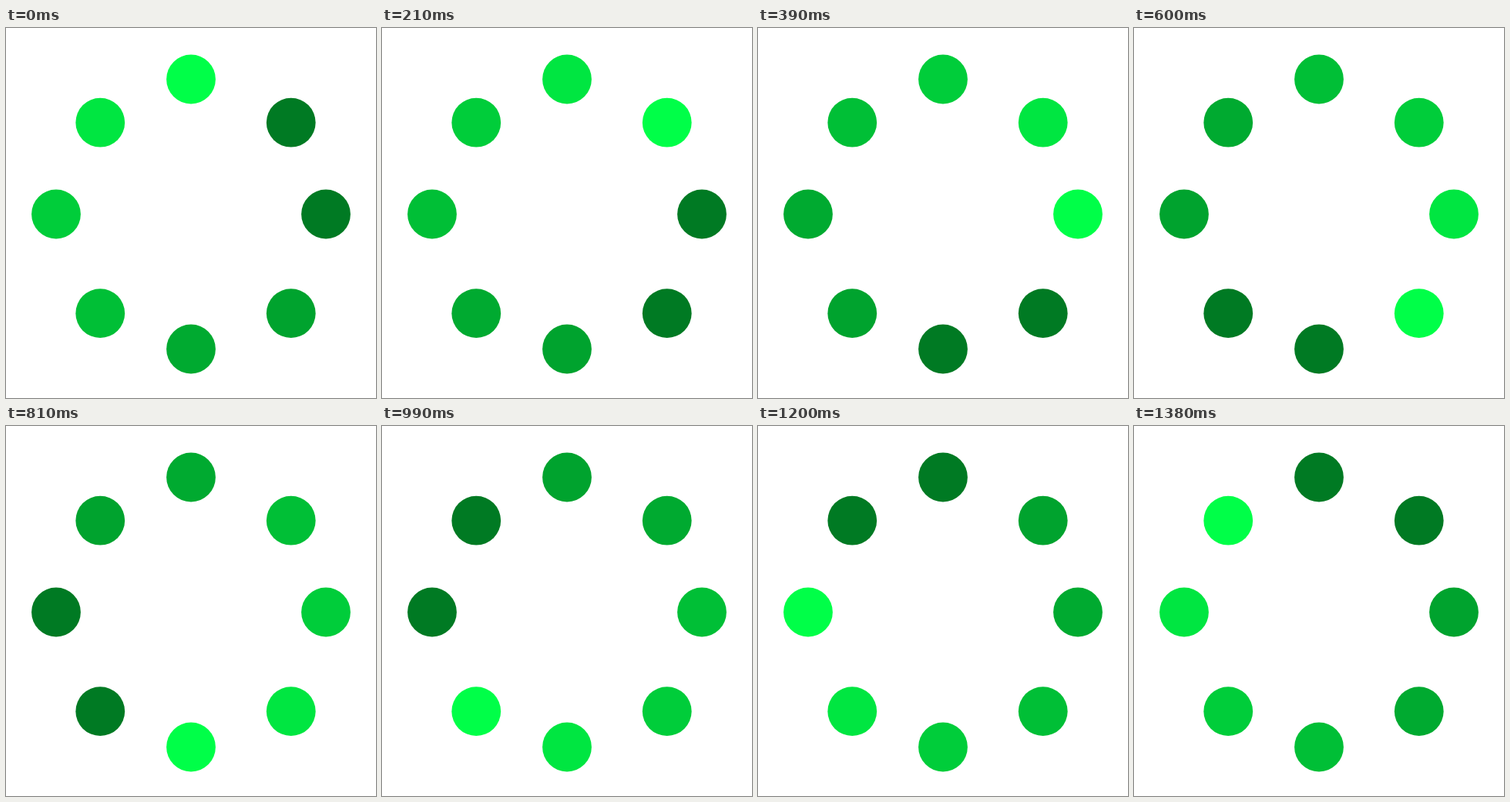
An HTML page that plays this animation: 480x480 px, repeating every 1590 ms.

```html
<!DOCTYPE html>
<html lang="en">
<head>
<meta charset="utf-8">
<title>Loading ring</title>
<style>
  html, body { margin: 0; width: 100%; height: 100%; overflow: hidden; background: #fff; }
  svg { display: block; width: 100vw; height: 100vh; }
</style>
</head>
<body>
<svg id="ring" viewBox="0 0 480 480"></svg>
<script>
  const LOOP = 1590, TICK = 30;
  const COUNT = 8, RADIUS = 175, DOT = 31.9;
  const TICKS_PER_STEP = LOOP / COUNT / TICK;

  // Head first, then the fading tail.
  const SHADES = ['#00ff48', '#00e641', '#00cd3a', '#00bf36', '#00aa30', '#00a32e', '#007a23', '#007a23'];

  const ring = document.getElementById('ring');

  // The diagonal dots sit on a ring of the same size, shifted down and right.
  const dots = Array.from({ length: COUNT }, (_, i) => {
    const angle = i / COUNT * 2 * Math.PI;
    const [cx, cy] = i % 2 ? [246, 246.4] : [240, 241.5];
    const dot = document.createElementNS(ring.namespaceURI, 'circle');
    dot.setAttribute('cx', cx + RADIUS * Math.sin(angle));
    dot.setAttribute('cy', cy - RADIUS * Math.cos(angle));
    dot.setAttribute('r', DOT);
    return ring.appendChild(dot);
  });

  // Equal steps, each start rounded to a whole tick.
  function stepAt(time) {
    const tick = Math.floor(time % LOOP / TICK);
    return Math.ceil((tick + 0.5) / TICKS_PER_STEP) - 1;
  }

  function draw() {
    const head = stepAt(performance.now());
    dots.forEach((dot, i) => dot.setAttribute('fill', SHADES[(head - i + COUNT) % COUNT]));
    requestAnimationFrame(draw);
  }
  draw();
</script>
</body>
</html>
```
